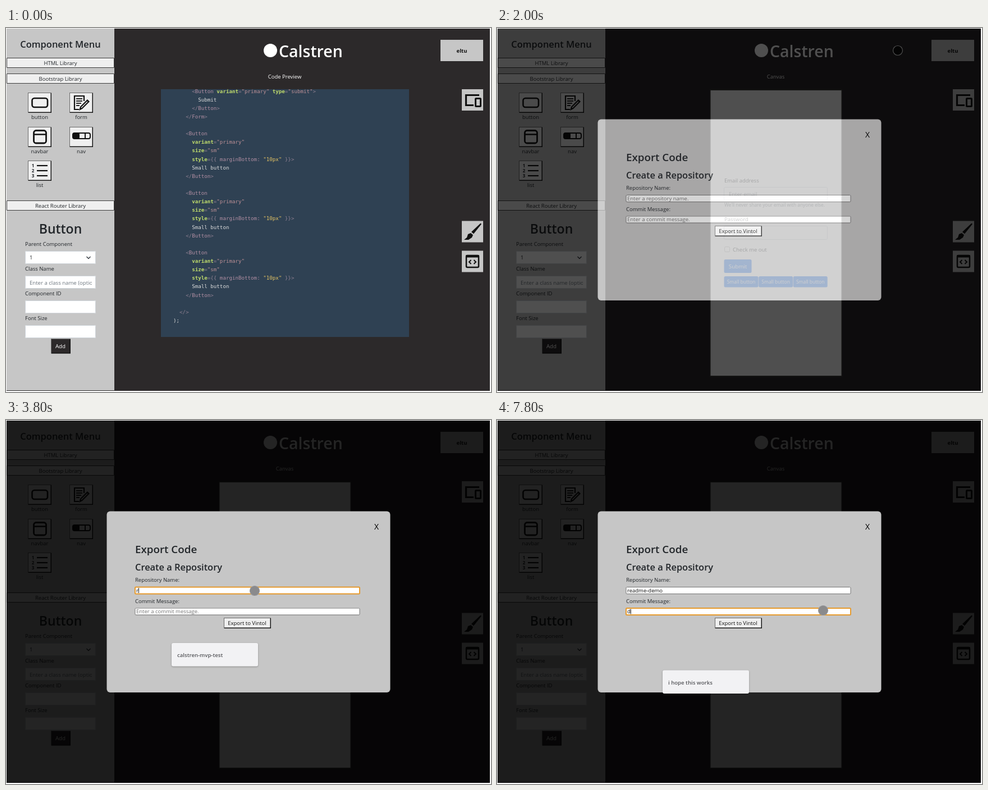
These frames come from a looping animation (864 by 648 pixels, 8000 ms). An HTML page with a canvas:

```html
<!DOCTYPE html>
<html lang="en">
<head>
<meta charset="utf-8">
<title>Component builder</title>
<style>
html, body { margin: 0; width: 100%; height: 100%; overflow: hidden; background: #fff; }
canvas { display: block; }
</style>
</head>
<body>
<canvas id="stage" width="864" height="648"></canvas>
<script>
const LOOP = 8000, STEP = 200;
const SANS = '"Open Sans", "Noto Sans", sans-serif';
const MONO = '"DejaVu Sans Mono", "Noto Sans Mono", monospace';
const INK = '#212529', GREY = '#c6c6c6', FACE = '#efefef', DARK = '#2c292a', HINT = '#6c757d';

const stage = document.getElementById('stage').getContext('2d');
const makeLayer = () => {
  const c = document.createElement('canvas');
  c.width = 864;
  c.height = 648;
  return c.getContext('2d');
};
let g = stage;

// Drawing helpers
function text(str, x, y, size = 9.5, { color = INK, weight = 400, align = 'left', font = SANS } = {}) {
  g.font = `${weight} ${size}px ${font}`;
  g.fillStyle = color;
  g.textAlign = align;
  g.fillText(str, x, y);
  return g.measureText(str).width;
}

const center = (str, x, y, size, opts) => text(str, x, y, size, { ...opts, align: 'center' });
const heading = { weight: 600 };

function fill(x, y, w, h, color, r = 0) {
  g.fillStyle = color;
  g.beginPath();
  g.roundRect(x, y, w, h, r);
  g.fill();
}

function outline(x, y, w, h, color, r = 0, width = 1) {
  g.strokeStyle = color;
  g.lineWidth = width;
  g.beginPath();
  g.roundRect(x, y, w, h, r);
  g.stroke();
}

function line(points, width = 2, color = '#111') {
  g.strokeStyle = color;
  g.lineWidth = width;
  g.beginPath();
  points.forEach(([x, y]) => g.lineTo(x, y));
  g.stroke();
}

function shape(points, color = '#111') {
  g.fillStyle = color;
  g.beginPath();
  points.forEach(([x, y]) => g.lineTo(x, y));
  g.fill();
}

function bevel(x, y, w, h, face = FACE) {
  fill(x, y, w, h, '#6b6b6b');
  fill(x + 1, y + 1, w - 1, h - 1, '#151515');
  fill(x + 1, y + 1, w - 2.5, h - 2.5, face);
}

function field(x, y, w, h) {
  fill(x, y, w, h, '#fff', 2);
  outline(x + .5, y + .5, w - 1, h - 1, '#ced4da', 2);
}

// Sidebar
function libraryBar(label, y) {
  fill(1, y, 192, 18, FACE);
  outline(1.5, y + .5, 191, 17, '#3c3c3c');
  center(label, 97, y + 12.5);
}

function tile(label, x, y) {
  bevel(x - 21, y - 18, 42, 36);
  center(label, x, y + 29);
}

function sidebarIcons() {
  tile('button', 60, 133);
  outline(46.5, 125, 27.5, 16, '#111', 4, 2.6);

  tile('form', 134, 133);
  line([[139, 130], [139, 121], [122, 121], [122, 145], [130, 145]], 2.2);
  for (const [y, end] of [[126, 136], [130, 136], [134, 134], [138, 131]]) line([[125, y], [end, y]], 1.8);
  shape([[145, 127], [149, 131], [136, 144], [130, 147], [132, 140]]);
  line([[134, 142], [145, 131]], 1.5, FACE);

  tile('navbar', 60, 194);
  outline(49.5, 182.5, 22, 22.5, '#111', 4, 2.8);
  line([[50, 189.5], [71, 189.5]], 2.5);

  tile('nav', 134, 194);
  outline(119, 187, 31, 10, '#111', 3, 2);
  fill(119, 187, 12, 10, '#111', 2);
  line([[141, 187], [141, 197]], 2);

  tile('list', 60, 254);
  [245, 254, 263].forEach((y, i) => {
    center(i + 1, 48, y + 3, 8, { weight: 700 });
    line([[55, y], [74, y]], 2.2);
  });
}

function sidebar() {
  fill(1, 1, 192, 644, GREY);
  center('Component Menu', 97, 35, 16.5, heading);
  libraryBar('HTML Library', 53);
  libraryBar('Bootstrap Library', 81);
  sidebarIcons();
  libraryBar('React Router Library', 307);

  center('Button', 97, 366, 23, heading);
  ['Parent Component', 'Class Name', 'Component ID', 'Font Size'].forEach((label, i) => {
    text(label, 34, 388 + i * 44.1);
    field(34, Math.round(397 + i * 44.1), 126, 23);
  });
  text('1', 42, 412);
  line([[143.5, 407], [147, 410.5], [150.5, 407]], 1.4, '#343a40');
  g.save();
  g.beginPath();
  g.rect(42, 442, 111, 22);
  g.clip();
  text('Enter a class name (optional)', 42, 456.5, 9.6, { color: HINT });
  g.restore();
  bevel(80, 553, 35, 26.5, DARK);
  center('Add', 97, 570, 9.8, { color: '#fff' });
}

// Header and right-hand tools
function tools() {
  g.fillStyle = '#fff';
  g.beginPath();
  g.arc(471, 40, 12, 0, 7);
  g.fill();
  text('Calstren', 486, 52, 28.5, { color: '#fff', weight: 600 });
  fill(774, 21, 76, 38, GREY);
  center('eltu', 812, 44, 9.5, { weight: 700, color: '#111' });

  for (const y of [109, 343.5, 396.5]) fill(812, y, 38, 38, GREY);
  line([[843, 119.5], [819.5, 119.5], [819.5, 137.5], [833, 137.5]], 3.2);
  outline(836.5, 125.5, 9, 14, '#111', 1, 3);

  shape([[845.5, 347.5], [847, 349], [833, 366.5], [829, 363]]);
  shape([[828, 365], [832, 368.5], [830, 373], [824, 377], [816, 377], [821, 373], [823, 367]]);

  outline(820, 405, 22, 21, '#111', 2, 2.5);
  line([[819, 406.5], [843, 406.5]], 4);
  line([[828.5, 413], [825, 416.5], [828.5, 420]], 2);
  line([[833.5, 413], [837, 416.5], [833.5, 420]], 2);
}

// Code preview
const smallButton = [
  '', '      <Button', '        variant="primary"', '        size="sm"',
  '        style={{ marginBottom: "10px" }}>', '        Small button', '      </Button>'
];
const codeLines = [
  '        <Button variant="primary" type="submit">', '          Submit', '        </Button>', '      </Form>',
  ...smallButton, ...smallButton, ...smallButton, '', '    </>', '  );'
];

function tokenStyle(token, plain) {
  if (token === '"10px"') return ['#e6c463', 400];
  if (token[0] === '"') return ['#bd9096', 400];
  if (/^(variant|type|size|style)$/.test(token)) return ['#c0dc6c', 700];
  if (/^[<>\/={}]+$/.test(token)) return ['#8d7f90', 400];
  return [plain ? '#dcdcdc' : '#b28fa3', 400];
}

function codePreview() {
  center('Code Preview', 496.5, 90, 9.5, { color: '#fff' });
  g.save();
  g.beginPath();
  g.rect(276, 109, 442, 441);
  g.clip();
  fill(276, 109, 442, 441, '#2f4153');
  codeLines.forEach((row, i) => {
    const plain = /^\s*[S)]/.test(row);
    let x = 287;
    for (const token of row.split(/("[^"]*"|\b(?:variant|type|size|style)\b|[<>\/={}]+)/)) {
      if (!token) continue;
      const [color, weight] = tokenStyle(token, plain);
      x += text(token, x, 115.5 + i * 15.13, 9.19, { color, weight, font: MONO });
    }
  });
  g.restore();
}

// Phone canvas with the rendered form
function blueButton(label, x, y, w, h, size) {
  fill(x, y, w, h, '#1a72f6', 2.5);
  center(label, x + w / 2, y + h / 2 + size * .36, size, { color: '#fff' });
}

function phoneCanvas() {
  center('Canvas', 496.5, 90, 9.5, { color: '#fff' });
  fill(379, 109, 236, 512, '#3a3a38');
  fill(380.5, 111, 233, 508, '#fff');
  text('Email address', 405, 275);
  field(404, 283, 185, 24);
  text('Enter email', 413, 299, 9.5, { color: HINT });
  text("We'll never share your email with anyone else.", 405, 318, 8.33, { color: HINT });
  text('Password', 405, 343.5);
  field(404, 352, 185, 25);
  text('Password', 413, 368, 9.5, { color: HINT });
  outline(405.5, 389.5, 9, 9, '#b5b5b5', 2);
  text('Check me out', 420, 397.5);
  blueButton('Submit', 404.5, 412, 49, 24, 9.8);
  for (let i = 0; i < 3; i++) blueButton('Small button', 404.5 + i * 61.6, 442, 61, 19.5, 8.5);
}

// Export dialog
const typing = [
  [3800, 'r'], [4000, 're'], [4200, 'rea'], [4600, 'read'], [4800, 'readm'], [5000, 'readme'],
  [5200, 'readme-d'], [5600, 'readme-de'], [5800, 'readme-demo']
];
const repoName = t => typing.reduce((last, [at, value]) => t >= at ? value : last, '');

function dialogInput(y, value, hint, focused) {
  fill(230, y, 400, 12, '#fff', 1.5);
  outline(230, y + .5, 400, 12, focused ? '#e59a2e' : '#767676', 1.5, focused ? 2 : 1);
  const w = text(value || hint, 232, y + 9.7, 9.5, { color: value ? '#111' : '#757575' });
  if (focused) fill(232 + (value ? w : 0), y + 2, 1, 9, '#111');
}

function suggestion(label, y) {
  g.save();
  g.shadowColor = 'rgba(0,0,0,.3)';
  g.shadowBlur = 3;
  g.shadowOffsetY = 1;
  fill(295, y, 154, 41.5, '#f2f2f4', 3);
  g.restore();
  text(label, 305, y + 25, 9.6, { color: '#55565a', weight: 600 });
}

function dialog(t) {
  fill(1, 1, 861, 645, 'rgba(0,0,0,.86)');
  fill(179.5, 162.5, 505, 322.5, GREY, 6);
  center('X', 660, 194.5, 14, { color: '#000' });
  text('Export Code', 230, 237, 18.8, heading);
  text('Create a Repository', 230, 268, 16.4, heading);
  text('Repository Name:', 230, 288);
  text('Commit Message:', 230, 326);
  dialogInput(297, repoName(t), 'Enter a repository name.', t >= 3200 && t < 6800);
  dialogInput(334.5, t >= 7800 ? 'd' : '', 'Enter a commit message.', t >= 6800);
  bevel(388, 352, 84, 19);
  center('Export to Vintol', 429.5, 365, 9.5, { color: '#111' });
  if (t >= 3400 && t < 4200) suggestion('calstren-mvp-test', 397);
  if (t >= 7000) suggestion('i hope this works', 445.5);
}

// Pointer: time, x, y
const path = [
  [200, 600, 566], [1200, 833, 128], [1400, 831, 128], [1800, 714, 40], [2000, 714, 40],
  [2200, 646, 132], [2800, 443, 304], [6200, 443, 304], [6800, 581, 339], [LOOP, 581, 339]
];

function pointer(t) {
  if (t < path[0][0]) return;
  const i = path.findIndex(p => p[0] > t);
  const [a, b] = [path[i - 1], path[i]];
  const k = (t - a[0]) / (b[0] - a[0]);
  const x = a[1] + (b[1] - a[1]) * k;
  const y = a[2] + (b[2] - a[2]) * k;
  const overDialog = t > 2000 && y > 162;
  const dimmed = t >= 2000;
  g.fillStyle = overDialog ? '#8a8a8c' : dimmed ? '#040404' : '#1a1613';
  g.strokeStyle = overDialog ? '#969698' : dimmed ? '#505050' : '#080808';
  g.lineWidth = 1.2;
  g.beginPath();
  g.arc(x, y, 8.5, 0, 7);
  g.fill();
  g.stroke();
}

const overlay = makeLayer();

function fade(t) {
  const k = Math.min(1, Math.max(0, (t - 1790) / 380));
  return 1 - (1 - k) ** 2;
}

function draw(t) {
  g = stage;
  fill(0, 0, 864, 648, '#fff');
  fill(1, 1, 861, 645, DARK);
  sidebar();
  tools();
  t < 1400 ? codePreview() : phoneCanvas();

  const alpha = fade(t);
  if (alpha > 0) {
    g = overlay;
    g.clearRect(0, 0, 864, 648);
    dialog(t);
    g = stage;
    g.globalAlpha = alpha;
    g.drawImage(overlay.canvas, 0, 0);
    g.globalAlpha = 1;
  }
  pointer(t);
}

const start = performance.now();
let shown = -1;
function tick() {
  const t = Math.floor((performance.now() - start) % LOOP / STEP) * STEP;
  if (t !== shown) draw(shown = t);
  requestAnimationFrame(tick);
}
tick();
</script>
</body>
</html>
```
